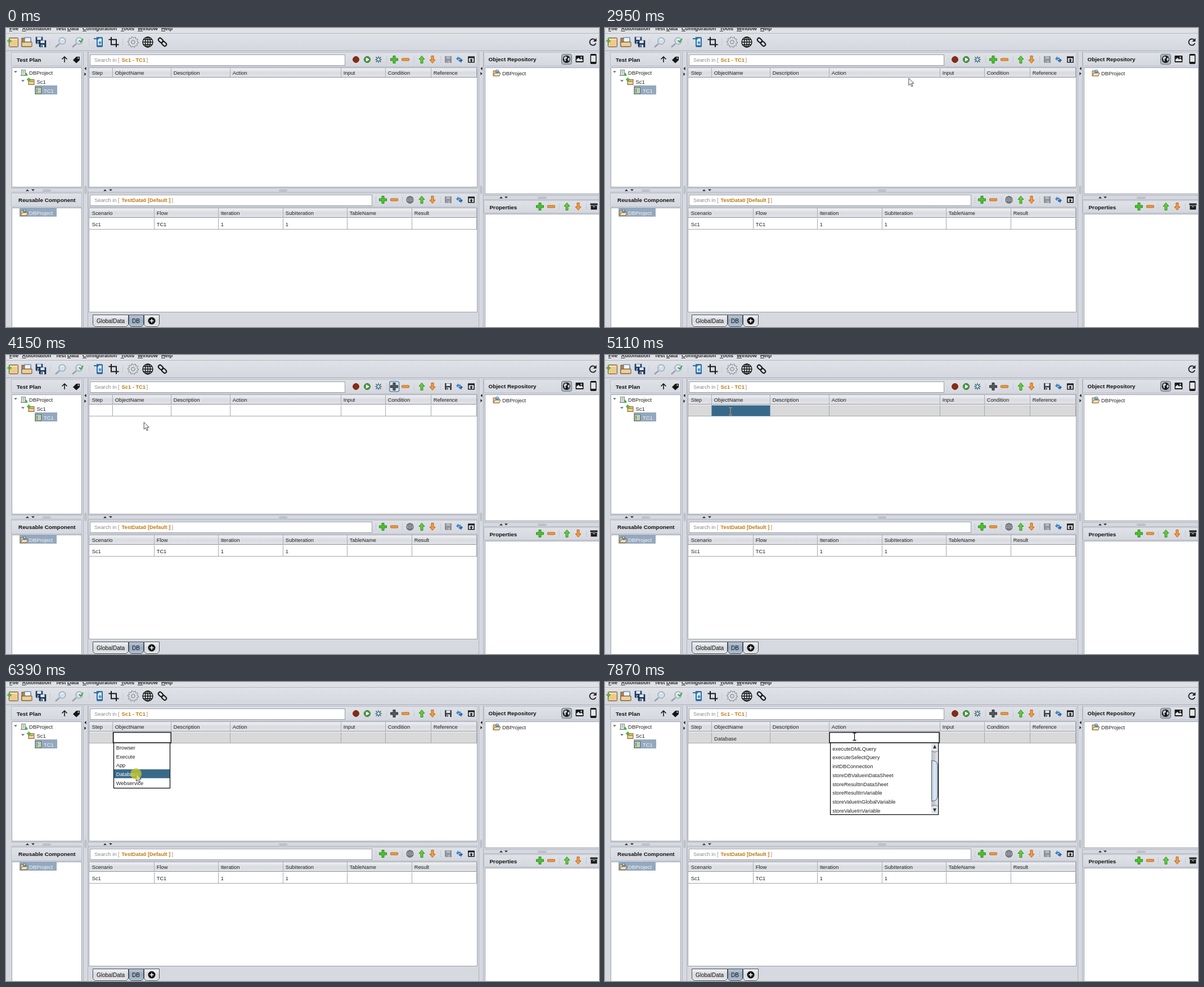
Write an HTML page that moves like this. It is 1054x531 px and loops after 8 s.

```html
<!DOCTYPE html>
<html lang="en">
<head>
<meta charset="utf-8">
<title>Test designer</title>
<style>
html, body { margin: 0; width: 100%; height: 100%; overflow: hidden; background: #d6d9e0; }
svg { display: block; width: 1054px; height: 531px; }
text { font: 9.33px "Liberation Sans", Arial, sans-serif; white-space: pre; }
.b { font-weight: bold; }
.h { font-weight: bold; font-size: 9.9px; }
.tab { font-size: 10px; }
</style>
</head>
<body>
<svg id="stage" viewBox="0 0 1054 531"></svg>
<script>
const LOOP = 8000, STEP = 66.6;
const BLUE = '#39698a', LINE = '#9b9fa8', GRID = '#a5a8ae', PICKED = '#94a8be';

const rect = (x, y, w, h, fill, more = '') =>
  `<rect x="${x}" y="${y}" width="${w}" height="${h}" fill="${fill}" ${more}/>`;
const box = (x, y, w, h, fill, line = LINE, r = 0) =>
  rect(x + .5, y + .5, w - 1, h - 1, fill, `stroke="${line}" rx="${r}"`);
const text = (x, y, s, fill = '#222', cls = '') =>
  `<text x="${x}" y="${y}" fill="${fill}" class="${cls}">${s}</text>`;
const path = (d, fill, more = '') => `<path d="${d}" fill="${fill}" ${more}/>`;
const stroke = (d, color, w = 1, more = '') =>
  path(d, 'none', `stroke="${color}" stroke-width="${w}" ${more}`);
const disc = (x, y, r, fill, more = '') => `<circle cx="${x}" cy="${y}" r="${r}" fill="${fill}" ${more}/>`;
const at = (x, y, s, k = 1) => `<g transform="translate(${x} ${y}) scale(${k})">${s}</g>`;
const on = (ranges, s) => `<g data-on="${ranges}">${s}</g>`;
const vlines = (xs, y, h, c) => xs.map(x => rect(x, y, 1, h, c)).join('');

// Icons, all centred on 0,0
const crossD = 'M-2 -6.5H2V-2H6.5V2H2V6.5H-2V2H-6.5V-2H-2Z';
const arrowD = 'M0 -6.5L5 -.5H2V6.5H-2V-.5H-5Z';
const plus = path(crossD, '#4cc22e', 'stroke="#2b8a1c"');
const darkPlus = path(crossD, '#55585c', 'stroke="#2c2e31"');
const minus = rect(-6.5, -2, 13, 4, '#f09a3c', 'stroke="#b9651a" rx="1"');
const up = path(arrowD, '#63cc3c', 'stroke="#2f8f20"');
const down = `<g transform="scale(1 -1)">${path(arrowD, '#f49a3a', 'stroke="#b9651a"')}</g>`;
const globe = (r, c, w) => disc(0, 0, r, 'none', `stroke="${c}" stroke-width="${w}"`) +
  `<ellipse rx="${r * .5}" ry="${r}" fill="none" stroke="${c}" stroke-width="${w}"/>` +
  stroke(`M0 ${-r}V${r}M${-r} 0H${r}M${-r * .87} ${-r / 2}H${r * .87}M${-r * .87} ${r / 2}H${r * .87}`, c, w);
const floppy = (c, label = '#e3e6ea') => path('M-6 -6H6V6H-4.5L-6 4.5Z', c) +
  rect(-3.5, -5.5, 7, 4.5, label) + rect(-3, 1.5, 6, 4.5, label) + rect(-2, 2.5, 2, 3, c);
const swap = path('M-6 -1L-2 -6V-3.5H2V-.5H-2V2Z', '#3f86c8') + path('M6 1L2 6V3.5H-1V.5H2V-2Z', '#2a66a8');
const popOut = stroke('M-5.2 -4.5H5.2V4.8H-5.2Z', '#1c1c1c', 1.5) + rect(-6, -5.5, 12, 3, '#1c1c1c') +
  path('M0 -1.5L3 1.5H1V4H-1V1.5H-3Z', '#1c1c1c');
const record = disc(0, 0, 5.4, '#8a2a10', 'stroke="#6a1d0a"');
const play = disc(0, 0, 5.5, '#4a9a42', 'stroke="#2f6e2b"') + path('M-2 -3.5L4 0L-2 3.5Z', '#fff');
const bug = stroke('M0 -6V6M-6 0H6M-4.5 -4.5L4.5 4.5M4.5 -4.5L-4.5 4.5', '#29485c', 1.1) +
  disc(0, 0, 3, '#c9e3ea', 'stroke="#2f6a80" stroke-width="1.2"');
const folder = path('M-6 5V-4H-2L-1 -2.5H5V5Z', '#e6c184', 'stroke="#8a6a3c"') +
  path('M-6 5L-3 0H7L4.5 5Z', '#f8e6c0', 'stroke="#8a6a3c"');
const project = folder + rect(-1.5, -6, 5, 6, '#4c86b9') + disc(1, -4, 1.2, '#d8e8f4');
const scenario = box(-4.5, -4, 11, 10, '#eccf8c', '#7c592c') + rect(-3, -1, 8, 1, '#7c592c') +
  at(-3.5, -3.5, plus, .45);
const testCase = box(-6, -6, 11, 12, '#e9efe0', '#50614a') +
  stroke('M-3 -3H3M-3 0H3M-3 3H3', '#5d8b55') + rect(-4, -4, 2, 8, '#6a9c62');
const root = box(-5, -6, 8, 11, '#eef2ee', '#71827a') + stroke('M-3 -3H1M-3 0H1', '#5f8a6a') +
  path('M-6 5V3H6V5Z', '#8b9da6') + path('M1 4L4 -1L7 4Z', '#4fae3c');
const lens = disc(3, -2, 5.8, '#cfe1ee', 'stroke="#93a2af" stroke-width="1.3"') +
  stroke('M-2 3L-9 9', '#9a9ea4', 2.4) + stroke('M0 -4Q2 -6 5 -5', '#fff', 1.3);
const checkedLens = lens + stroke('M3 -3L6 0L10 -6', '#3aa52c', 2);
const newFile = box(-7, -8, 17, 17, '#ecc98d', '#6a4c26', 1) + rect(-5, -5, 13, 1, '#fff3d8') +
  at(-6, -2, plus, .5);
const openFile = path('M-9 8V-7H-3L-1 -5H7V8Z', '#b98445', 'stroke="#6a4c26"') +
  rect(-4, -8, 11, 8, '#eef4fa', 'stroke="#46698b"') +
  path('M-9 8V0H9V8Z', '#f0cf96', 'stroke="#6a4c26"');
const saveAll = at(-3, -3, floppy('#1d3d6e'), 1.05) + at(3, 3, floppy('#142f58'), 1.05);
const phoneLink = rect(-4, -9, 11, 18, '#2c6da4', 'rx="2"') + rect(-2, -6.5, 7, 12, '#dcebf6') +
  stroke('M-9 -6H-1M-4 -8.5L-1 -6L-4 -3.5', '#2c6da4', 1.8) + disc(2, 1, 2.5, '#4f96cd');
const crop = stroke('M-4.5 -9V4.5H9M-9 -4.5H4.5V9', '#1a1a1a', 2);
const cogD = 'M' + Array.from({ length: 40 }, (_, i) => {
  const r = i % 4 < 2 ? 9.5 : 7.3, a = i * Math.PI / 20;
  return `${(r * Math.cos(a)).toFixed(1)} ${(r * Math.sin(a)).toFixed(1)}`;
}).join('L') + 'Z';
const gear = path(cogD, '#dfe1e5', 'stroke="#74787e"') + disc(0, 0, 3.4, '#d6d9e0', 'stroke="#74787e"');
const link = [-3, 3].map(d => rect(d - 4.7, d - 3, 9.4, 6, 'none',
  `rx="3" stroke="#1a1a1a" stroke-width="2" transform="rotate(45 ${d} ${d})"`)).join('');
const reload = stroke('M4 -4A5.6 5.6 0 1 0 5.4 2', '#1a1a1a', 1.8) + path('M6.5 -7V-1H.5Z', '#1a1a1a');
const tag = path('M-6 1L0 -5H6V1L0 6.5Z', '#151515') + disc(3.5, -2.5, 1.2, '#d6d9e0');
const picture = rect(-7, -6, 14, 12, '#1a1a1a', 'rx="1"') +
  path('M-5.5 4V1L-2 -2L1 1L3 -1L5.5 2V4Z', '#e4e6ea') + disc(3, -3, 1.3, '#e4e6ea');
const phone = rect(-5.5, -9, 11, 18, '#1a1a1a', 'rx="2"') + rect(-4, -6, 8, 11, '#e4e6ea');
const archive = rect(-6.5, -5.5, 13, 3, '#1a1a1a') + rect(-5.5, -1.5, 11, 7, '#1a1a1a') + rect(-2, 0, 4, 1, '#ddd');
const sep = (x, y) => stroke(`M${x + .5} ${y - 5}V${y + 6}`, '#a4a8b0', 1, 'stroke-dasharray="1 2"');
const tri = (x, y, a, c = '#222') => `<g transform="translate(${x} ${y}) rotate(${a})">${path('M-3 1.6L0 -1.6L3 1.6Z', c)}</g>`;
const grip = (x, y, w, h) => box(x, y, w, h, '#eceef2', '#979ba4', 1);

const toolbar = (y, list) => list.map(([x, s]) => s ? at(x, y, s) : sep(x, y)).join('');
const panelHead = (x, y, w, h) => box(x, y, w, h, 'url(#bar)', '#b9bdc6');
const search = (y, w, name, endX) => box(149, y, w, 20, '#fff', '#989ca5') +
  text(157, y + 13.4, 'Search in [', '#8a8a8a') + text(205.5, y + 13.4, name, '#c07a12', 'b') +
  text(endX, y + 13.4, ']', '#8a8a8a');

const COLS = [189, 293, 398, 595, 674, 755], LOW = [263, 377, 492, 606, 721];
const table = (y, h, cols, names) => box(147, y, 691, h, '#fff') +
  rect(148, y + 1, 689, 17, 'url(#head)') + rect(148, y + 17, 689, 1, '#8c9098') +
  vlines([...cols, 836], y + 1, 16, '#a9adb5') +
  names.map((s, i) => text(i ? cols[i - 1] + 4.7 : 152.7, y + 13.2, s)).join('');
const row = (y, cols, fill) => rect(148, y, 688, 19, fill) + rect(148, y + 19, 689, 1, GRID) +
  vlines([...cols, 836], y, 20, GRID);

const chrome = [
  rect(0, 0, 1054, 531, '#d6d9e0'),
  rect(0, 0, 1054, 9, '#dfe1e6'), rect(0, 9, 1054, 1, '#b4b8c1'),
  rect(0, 10, 1054, 30, 'url(#bar)'), rect(0, 40, 1054, 1, '#a9adb6'),
  [[6, 'File', 5], [28.5, 'Automation', 7], [88, 'Test Data', 0], [136, 'Configuration', 7],
   [204, 'Tools', 6], [234, 'Window', 9], [276, 'Help', 7]].map(([x, s, u]) =>
    text(x, 3.6, s, '#222', 'b') + rect(u ? x : 109, 5, u || 6, 1, '#333')).join(''),
  toolbar(25, [[12, newFile], [37, openFile], [62, saveAll], [78], [97, lens], [127, checkedLens],
    [147], [165, phoneLink], [191.5, crop], [207], [226, gear], [252, globe(9, '#111', 1.4)],
    [278, link], [1043, reload]]),

  panelHead(9, 43, 126, 25), text(19, 60, 'Test Plan', '#111', 'h'),
  at(104, 56, stroke('M0 5V-5M-4.5 -.5L0 -5L4.5 -.5', '#111', 1.5)), at(125, 56, tag),
  box(10, 70, 125, 213, '#fff'),
  tri(17, 78, 180, '#666'), at(32, 80, root), text(41, 83.3, 'DBProject'),
  tri(30, 94, 180, '#666'), at(44, 95, scenario), text(54.5, 98.7, 'Sc1'),
  rect(51, 102, 40, 16, PICKED), at(58, 111, testCase), text(67, 114.5, 'TC1', '#f4f6f8'),
  rect(9, 284, 126, 1, '#b1b5be'), rect(9, 291, 126, 1, '#b1b5be'),
  tri(38, 288, 0), tri(48, 288, 180), grip(65, 287, 15, 3),
  panelHead(9, 293, 126, 25), text(22, 308.6, 'Reusable Component', '#111', 'h'),
  box(10, 319, 125, 220, '#fff'),
  rect(24, 319, 66, 16, PICKED), at(32, 328, project), text(41, 331.8, 'DBProject', '#f4f6f8'),

  rect(137, 42, 1, 489, '#aeb2bb'), rect(145, 42, 1, 489, '#aeb2bb'),
  tri(141, 72, -90), tri(141, 82, 90), grip(140, 280, 3, 15),
  rect(840, 42, 1, 489, '#aeb2bb'), rect(848, 42, 1, 489, '#aeb2bb'),
  tri(845, 72, -90), tri(845, 81, 90), grip(843, 280, 3, 15),

  panelHead(146, 43, 692, 26), search(47, 454, 'Sc1 - TC1', 249.6),
  toolbar(56, [[622, record], [642, play], [662, bug], [676], [690, plus], [710, minus], [725],
    [739, up], [758, down], [772], [786, floppy('#8a8d92', '#b4b7bc')], [806, swap], [827, popOut]]),
  table(70, 213, COLS, ['Step', 'ObjectName', 'Description', 'Action', 'Input', 'Condition', 'Reference']),
  rect(146, 284, 692, 1, '#b1b5be'), rect(146, 291, 692, 1, '#b1b5be'),
  tri(176, 288, 0), tri(186, 288, 180), grip(485, 287, 15, 3),
  panelHead(146, 293, 692, 25), search(296, 502, 'TestData0 [Default ]', 294.4),
  toolbar(305, [[657], [670, plus], [690, minus], [704], [718, globe(6, '#55595e', 1.1)],
    [739, up], [758, down], [772], [786, floppy('#8a8d92', '#b4b7bc')], [806, swap], [827, popOut]]),
  table(319, 186, LOW, ['Scenario', 'Flow', 'Iteration', 'SubIteration', 'TableName', 'Result']),
  row(338, LOW, '#fff'),
  ['Sc1', 'TC1', '1', '1'].map((s, i) => text(i ? LOW[i - 1] + 4.7 : 152.7, 352, s)).join(''),
  [[154, 64, 'url(#head)'], [218, 27, 'url(#tab)'], [245, 28, 'url(#head)']].map(([x, w, f]) =>
    path(`M${x + .5} 509.5H${x + w - .5}V526.5L${x + w - 4.5} 530.5H${x + 4.5}L${x + .5} 526.5Z`, f, 'stroke="#4b5058"')).join(''),
  text(161, 523.8, 'GlobalData', '#111', 'tab'), text(224, 523.8, 'DB', '#111', 'tab'),
  disc(259, 520, 6.5, '#111'), stroke('M259 516.5V523.5M255.5 520H262.5', '#fff', 1.6),

  panelHead(849, 43, 210, 25), text(857.5, 59.2, 'Object Repository', '#111', 'h'),
  box(987, 46, 19, 19, '#aeb4be', '#6b717c', 3), at(996.3, 55.3, disc(0, 0, 6.6, '#1a1a1a') +
    path('M-5 -2L-2 -5L1 -4L0 -1L-2 0L-1 3L-3 4Z', '#cdd2d9') + path('M2 -1L5 -3L5.5 1L3 4Z', '#cdd2d9')),
  at(1019.5, 55, picture), at(1044, 55, phone),
  box(851, 70, 210, 225, '#fff'), at(872, 80, project), text(882, 83.8, 'DBProject'),
  rect(849, 297, 205, 1, '#b1b5be'), rect(849, 304, 205, 1, '#b1b5be'),
  tri(880, 301, 0), tri(889, 301, 180), grip(945, 300, 16, 3),
  panelHead(849, 306, 210, 23), text(859.5, 321.6, 'Properties', '#111', 'h'),
  toolbar(317, [[949, plus], [969, minus], [983], [997, up], [1017, down], [1031], [1045, archive]]),
  box(851, 330, 210, 210, '#fff')
].join('');

const PITCH = 15.7;
const OBJECTS = ['Browser', 'Execute', 'App', 'Database', 'Webservice'];
const ACTIONS = ['executeDMLQuery', 'executeSelectQuery', 'initDBConnection', 'storeDBValueinDataSheet',
  'storeResultInDataSheet', 'storeResultInVariable', 'storeValueInGlobalVariable', 'storeValueInVariable'];
const picked = (x, w) => box(x, 89, w, 20, BLUE, '#6d9dbd');
const editor = (x, w) => rect(x + .75, 89.5, w - 1.5, 18.5, '#fff', 'stroke="#111" stroke-width="1.5"');

const objectList = rect(191.5, 108, 100, 80.5, '#fff', 'stroke="#111" stroke-width="1.3"') +
  rect(192, 108, 99, PITCH, BLUE, 'id="hover"') +
  OBJECTS.map((s, i) => `<g class="item">${text(195.7, 120 + i * PITCH, s)}</g>`).join('');
const actionList = rect(400.6, 108, 192, 127.5, '#fff', 'stroke="#111" stroke-width="1.3"') +
  ACTIONS.map((s, i) => text(404.3, 121.7 + i * PITCH, s)).join('') +
  rect(580, 109, 12, 126, 'url(#track)') + rect(580, 109, 12, 13, '#e2e5ea') + rect(580, 221, 12, 14, '#e2e5ea') +
  path('M580.5 139.5Q591 139.5 591.5 148V203Q591 211.5 580.5 211.5Z', 'url(#thumb)', 'stroke="#4d5b6b"') +
  stroke('M580 122Q586 127 592 122M580 221Q586 216 592 221', '#7c838d') +
  path('M583 118L586 111.5L589 118Z', '#333') + path('M583 224.5L586 231L589 224.5Z', '#333');

const hoverBox = (x, y, s) => box(x, y, s, s, 'rgba(255,255,255,.35)', '#8b919c', 3);
const beam = (c, w) => stroke('M-3 -6.5H3M0 -6.5V6.5M-3 6.5H3', c, w);
const live = [
  on('2140-2600', hoverBox(115, 13, 24) + at(127, 25, checkedLens)),
  on('3340-3740', hoverBox(681, 47, 18) + at(690, 56, plus)),
  on('3740-8000', rect(682, 48, 16, 16, '#dcdfe5') + at(690, 56, darkPlus) +
    rect(779, 49, 14, 14, '#dcdfe5') + at(786, 56, floppy('#3d4044'))),
  on('3740-4760', rect(681.7, 47, 17, 18, 'none', 'rx="3" stroke="#5c8fb8" stroke-width="1.6"')),
  on('3740-4760', row(89, COLS, '#fff')),
  on('4760-8000', row(89, COLS, '#d9d9d9')),
  on('4760-5180,6460-7400', picked(189, 105)),
  on('5180-6460', editor(190, 104)),
  on('5240-6460', objectList),
  on('6460-7400', text(194, 103.6, 'Database', '#fff')),
  on('7400-8000', text(194, 103.6, 'Database')),
  on('7400-7740', picked(398, 197)),
  on('7740-8000', editor(398.3, 196.5)),
  on('7800-8000', actionList),
  '<g id="pointer">',
  on('1130-4960,5440-7530', path('M.5 .5V13L3.4 10.3L5.5 15.2L7.6 14.3L5.5 9.5H9.4Z', '#fff', 'stroke="#333" stroke-width=".9"')),
  on('3680-3740,4760-4830,6260-6460,7000-7070,7330-7400', disc(0, 0, 10, 'rgba(202,205,40,.75)')),
  on('4960-5180', beam('#c8936c', 1.2)),
  on('5180-5440,7530-8000', beam('#111', 1.3)),
  '</g>'
].join('');

const grad = (id, stops, side = 0) => `<linearGradient id="${id}" x2="${side}" y2="${1 - side}">` +
  stops.map((c, i) => `<stop offset="${i / (stops.length - 1)}" stop-color="${c}"/>`).join('') + '</linearGradient>';
const stage = document.getElementById('stage');
stage.innerHTML = '<defs>' + grad('bar', ['#dfe2e7', '#d4d7de']) + grad('head', ['#f0f1f4', '#d9dbe0', '#e3e5e9']) +
  grad('tab', ['#b9c6d5', '#98acc2', '#b0c0d2']) + grad('track', ['#b5bac2', '#e5e8ec'], 1) +
  grad('thumb', ['#b3c4d5', '#e1ecf5', '#b3c8dc'], 1) + `</defs><g>${chrome}</g><g>${live}</g>`;

// Pointer path: time, x, y
const PATH = [
  [1130, 1039, 528], [1260, 1018, 521], [1520, 1018, 521], [1660, 1040, 380], [1795, 1007, 180],
  [1930, 660, 50], [2130, 128, 20], [2530, 128, 20], [2740, 300, 40], [2925, 536, 88],
  [3060, 620, 106], [3320, 689, 61], [3460, 689, 59], [3930, 689, 59], [4125, 245, 119],
  [4400, 228, 110], [4650, 223, 100], [5430, 223, 100], [5700, 232, 140], [5920, 236, 181],
  [6180, 231, 163], [6460, 231, 163], [6700, 350, 125], [6980, 443, 99.5], [7480, 443, 99.5], [7600, 443.5, 97]
];
const timed = [...stage.querySelectorAll('[data-on]')].map(el =>
  [el, el.dataset.on.split(',').map(r => r.split('-').map(Number))]);
const pointer = document.getElementById('pointer');
const hover = document.getElementById('hover');
const items = [...stage.querySelectorAll('.item text')];

function locate(t) {
  const i = PATH.findIndex(p => p[0] > t);
  if (i < 1) return (i ? PATH[PATH.length - 1] : PATH[0]).slice(1);
  const [a, b] = [PATH[i - 1], PATH[i]], k = (t - a[0]) / (b[0] - a[0]);
  return [a[1] + (b[1] - a[1]) * k, a[2] + (b[2] - a[2]) * k];
}

function draw(t) {
  for (const [el, ranges] of timed)
    el.style.display = ranges.some(([a, b]) => t >= a && t < b) ? '' : 'none';
  const [x, y] = locate(Math.floor(t / STEP) * STEP);
  pointer.setAttribute('transform', `translate(${x.toFixed(1)} ${y.toFixed(1)})`);
  const n = Math.floor((y - 108) / PITCH);
  hover.style.display = n >= 0 && n < OBJECTS.length ? '' : 'none';
  hover.setAttribute('y', 108 + n * PITCH);
  items.forEach((el, i) => el.setAttribute('fill', i === n ? '#fff' : '#222'));
}

const start = performance.now();
function tick() {
  draw((performance.now() - start) % LOOP);
  requestAnimationFrame(tick);
}
tick();
</script>
</body>
</html>
```
